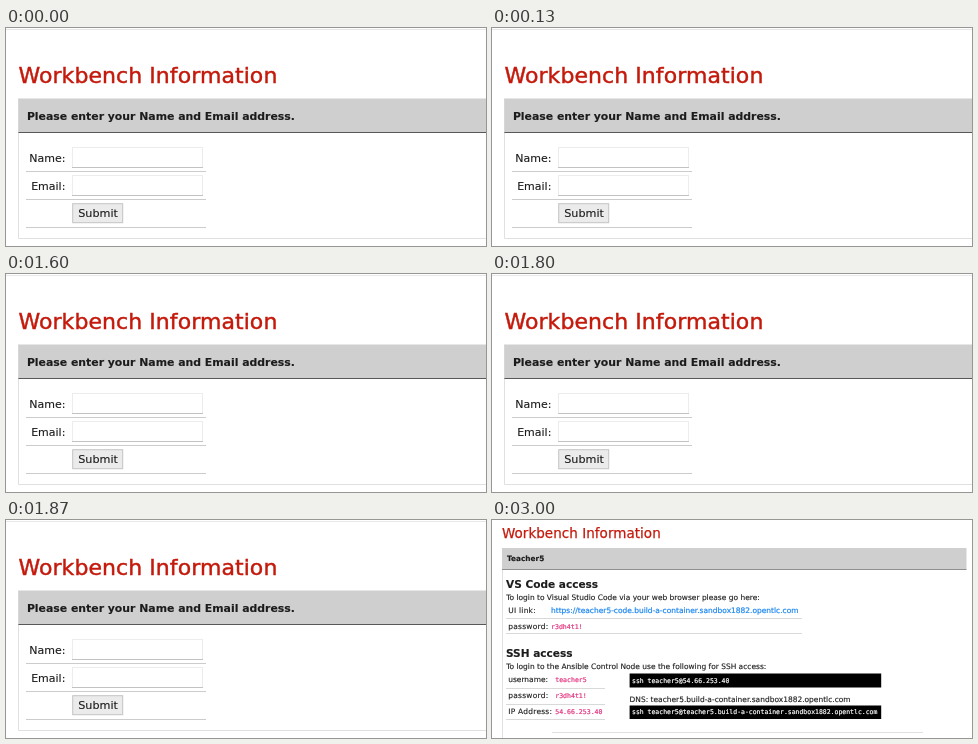
Animation of 480x218 px, one loop 5.99 s. Source, as an HTML page:

```html
<!DOCTYPE html>
<html lang="en">
<head>
<meta charset="utf-8">
<title>Workbench Information</title>
<style>
html, body { margin: 0; width: 100%; height: 100%; overflow: hidden; background: #fff; }
svg { display: block; width: 480px; height: 218px; }
text {
  font-family: "DejaVu Sans", Verdana, sans-serif;
  fill: #1c1c1c; stroke: #1c1c1c; stroke-width: .12px; white-space: pre;
}
.title { fill: #c41a0c; stroke: #c41a0c; stroke-width: .45px; letter-spacing: .07px; }
.details .title { stroke-width: .25px; letter-spacing: .04px; }
.bold { font-weight: bold; }
.label { font-size: 11px; text-anchor: end; }
.rule { stroke: #ccc; fill: none; }
.frame { stroke: #e0e0e0; fill: none; }
.bar { fill: #cfcfcf; }
.edge { stroke: #585858; }
.field { fill: #fff; stroke: #ececec; }
.under { stroke: #c2c2c2; }
.small { font-size: 7.48px; }
.wide { letter-spacing: .25px; }
.head { font-size: 10.55px; font-weight: bold; }
.link { fill: #1a86f0; stroke: #1a86f0; stroke-width: .2px; }
.code, .cmd { font-family: "DejaVu Sans Mono", monospace; font-size: 6.55px; stroke-width: .2px; }
.code { fill: #e3337f; stroke: #e3337f; }
.cmd { font-size: 6.47px; fill: #fff; stroke: #fff; }
.details { animation: show 5990ms step-end infinite; }
@keyframes show {
  0% { visibility: hidden; }
  50.0835% { visibility: visible; }
  100% { visibility: visible; }
}
</style>
</head>
<body>
<svg viewBox="0 0 480 218">
  <g class="form">
    <path d="M0 1.5H480" stroke="#e8e8e8"/>
    <text class="title" x="12.4" y="55" font-size="22">Workbench Information</text>
    <path class="frame" d="M12.5 70.5V210.5H480"/>
    <rect class="bar" x="12.4" y="70.5" width="468" height="34"/>
    <path class="edge" d="M12.4 104.5H480"/>
    <text class="bold" x="20.9" y="92" font-size="10.88">Please enter your Name and Email address.</text>
    <path class="rule" d="M20 143.5H200M20 171.5H200M20 199.5H200"/>
    <text class="label" x="59.4" y="134">Name:</text>
    <rect class="field" x="66.5" y="119.5" width="130" height="20"/>
    <path class="under" d="M66 139.5H197"/>
    <text class="label" x="59.4" y="162">Email:</text>
    <rect class="field" x="66.5" y="147.5" width="130" height="20"/>
    <path class="under" d="M66 167.5H197"/>
    <rect x="66.7" y="175.7" width="50" height="19" fill="#ebebeb" stroke="#c4c4c4"/>
    <text x="72.2" y="189" font-size="11.2">Submit</text>
  </g>

  <g class="details">
    <rect width="480" height="218" fill="#fff"/>
    <text class="title" x="9.9" y="18" font-size="13.5">Workbench Information</text>
    <path class="frame" d="M10.5 28V218"/>
    <rect class="bar" x="10" y="28" width="464.5" height="21.5"/>
    <path d="M10 49.5H474.5" stroke="#909090"/>
    <text class="bold" x="15" y="41.3" font-size="7.35">Teacher5</text>

    <text class="head" x="14" y="68">VS Code access</text>
    <text class="small" x="14.2" y="80">To login to Visual Studio Code via your web browser please go here:</text>
    <text class="small wide" x="16.2" y="93">UI link:</text>
    <text class="small link" x="59" y="93">https://teacher5-code.build-a-container.sandbox1882.opentlc.com</text>
    <path class="rule" d="M14 98.5H310M14 113.5H310" opacity=".75"/>
    <text class="small wide" x="16.2" y="109">password:</text>
    <text class="code" x="59" y="109">r3dh4t1!</text>

    <text class="head" x="14" y="137">SSH access</text>
    <text class="small" x="14.2" y="149">To login to the Ansible Control Node use the following for SSH access:</text>
    <path class="rule" d="M14 168.5H113M14 184.5H113M14 199.5H113" opacity=".75"/>
    <text class="small" x="16.2" y="162">username:</text>
    <text class="code" x="63.2" y="162">teacher5</text>
    <text class="small wide" x="16.2" y="178">password:</text>
    <text class="code" x="63.2" y="178">r3dh4t1!</text>
    <text class="small wide" x="16.2" y="194">IP Address:</text>
    <text class="code" x="63.2" y="194">54.66.253.40</text>

    <path d="M137.6 153.6H389.2V167.6H137.6ZM137.6 185.4H389.2V199H137.6Z"/>
    <text class="cmd" x="140" y="162.5">ssh teacher5@54.66.253.40</text>
    <text class="small" x="137.6" y="182.3">DNS: teacher5.build-a-container.sandbox1882.opentlc.com</text>
    <text class="cmd" x="140" y="194.3">ssh teacher5@teacher5.build-a-container.sandbox1882.opentlc.com</text>
    <path class="rule" d="M60 212.5H431" opacity=".6"/>
  </g>
</svg>
</body>
</html>
```
